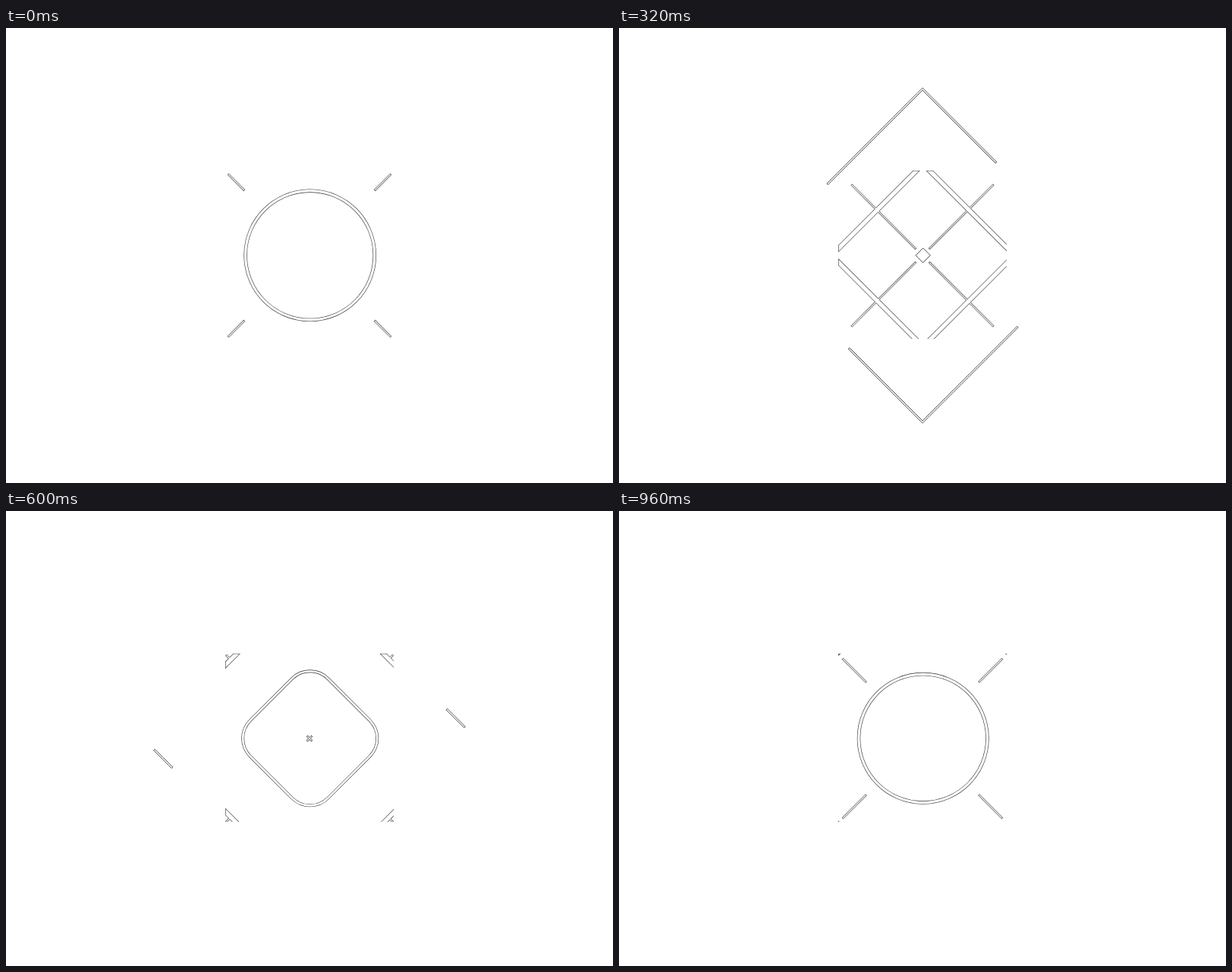
Recreate the animation shown at these times as an HTML page with a canvas. Size 800 by 600 pixels, loop 1 s.

```html
<!DOCTYPE html>
<html lang="en">
<head>
<meta charset="utf-8">
<title>Geometric loop</title>
<style>
html, body { margin: 0; width: 100%; height: 100%; overflow: hidden; background: #fff; }
canvas { display: block; }
</style>
</head>
<body>
<canvas id="stage" width="800" height="600"></canvas>
<script>
const ctx = document.getElementById('stage').getContext('2d');
const LOOP = 1000, STEP = 40;
const CX = 400, CY = 300;
const INK = '#333', PAPER = '#fff';
const EDGE = 0.6;
const BOX = { x: 289, y: 188, w: 222, h: 222 };
const SIDE = 85.1;

// Cubic bezier (.51, 0, 0, 1) running from start for dur milliseconds
function ease(t, start, dur) {
  const x = (t - start) / dur;
  if (x <= 0) return 0;
  if (x >= 1) return 1;
  let lo = 0, hi = 1;
  for (let i = 0; i < 24; i++) {
    const s = (lo + hi) / 2;
    const v = 3 * (1 - s) * (1 - s) * s * 0.51 + s * s * s;
    if (v < x) lo = s; else hi = s;
  }
  return lo * lo * (3 - 2 * lo);
}

// Exponential settling after a start time
const settle = (t, start, rate, power) =>
  t <= start ? 0 : 1 - Math.exp(-rate * Math.pow((t - start) / 80, power));

function line(points, width) {
  return {
    width,
    pad: EDGE / 2,
    path(pad) {
      const p = points.map(q => q.slice());
      const last = p.length - 1;
      stretch(p[0], p[1], pad);
      stretch(p[last], p[last - 1], pad);
      ctx.beginPath();
      p.forEach(([x, y]) => ctx.lineTo(x, y));
    }
  };
}

// Move end away from next by d
function stretch(end, next, d) {
  const dx = end[0] - next[0], dy = end[1] - next[1];
  const len = Math.hypot(dx, dy) || 1;
  end[0] += dx / len * d;
  end[1] += dy / len * d;
}

// Rounded square standing on its corner; half is half its side
function ring(half, round, width) {
  return {
    width,
    pad: 0,
    path() {
      ctx.save();
      ctx.translate(CX + 0.7, CY - 0.2);
      ctx.rotate(Math.PI / 4);
      ctx.beginPath();
      ctx.roundRect(-half, -half, 2 * half, 2 * half, half * round);
      ctx.restore();
    }
  };
}

function strokeAll(shapes, color, grow) {
  ctx.strokeStyle = color;
  for (const s of shapes) {
    const w = s.width + grow * EDGE;
    if (w <= 0) continue;
    ctx.lineWidth = w;
    s.path(grow * s.pad);
    ctx.stroke();
  }
}

// Outline of the union: all ink first, then all paper on top
function outline(shapes, box) {
  for (const [color, grow] of [[INK, 1], [PAPER, -1]]) {
    ctx.save();
    if (box) {
      const inset = grow < 0 ? EDGE : 0;
      ctx.beginPath();
      ctx.rect(box.x + inset, box.y + inset, box.w - inset, box.h - inset);
      ctx.clip();
    }
    strokeAll(shapes, color, grow);
    ctx.restore();
  }
}

function burst(t, start) {
  const head = 110 * ease(t, start, 640);
  const tail = 110 * ease(t, start + 200, 640);
  if (head - tail < 0.3) return [];
  const arms = [];
  for (const sx of [-1, 1]) {
    for (const sy of [-1, 1]) {
      arms.push(line([
        [CX + sx * tail, CY + sy * tail],
        [CX + sx * head, CY + sy * head]
      ], 2));
    }
  }
  return arms;
}

function frameLines(t) {
  const at = u => 432 * u - 216;
  const head = at(ease(t, 0, 800));
  const tail = at(ease(t, 120, 800));
  if (head - tail < 0.3) return [];
  const xs = [tail, head];
  if (tail < 0 && head > 0) xs.splice(1, 0, 0);
  return [1, -1].map(dir => line(
    xs.map(x => [CX + dir * x, CY - dir * (219.5 - Math.abs(x))]), 2.2));
}

function outerRing(t) {
  const half = SIDE + 76 * settle(t, 320, 0.548, 0.905);
  const thick = 3.8 + 2.2 * ease(t, 100, 240);
  return ring(half, 1 - ease(t, 0, 540), thick);
}

function innerRing(t) {
  const seed = t < 320 ? 0.1 - 0.02 * (t - 160) / 160 : 0.08;
  const scale = seed + (1 - seed) * settle(t, 320, 0.351, 1.315);
  const round = t < 320 ? 0.25 * (320 - t) / 160 : ease(t, 440, 520);
  return ring(SIDE * scale, round, 3.8 * scale);
}

function draw(t) {
  ctx.fillStyle = PAPER;
  ctx.fillRect(0, 0, 800, 600);
  const shapes = [outerRing(t), ...burst(t, 0), ...burst(t, 520), ...burst(t + LOOP, 520)];
  if (t >= 120) shapes.push(innerRing(t));
  outline(shapes, BOX);
  outline(frameLines(t));
}

function tick() {
  const t = performance.now() % LOOP;
  draw(Math.floor(t / STEP) * STEP);
  requestAnimationFrame(tick);
}
tick();
</script>
</body>
</html>
```
